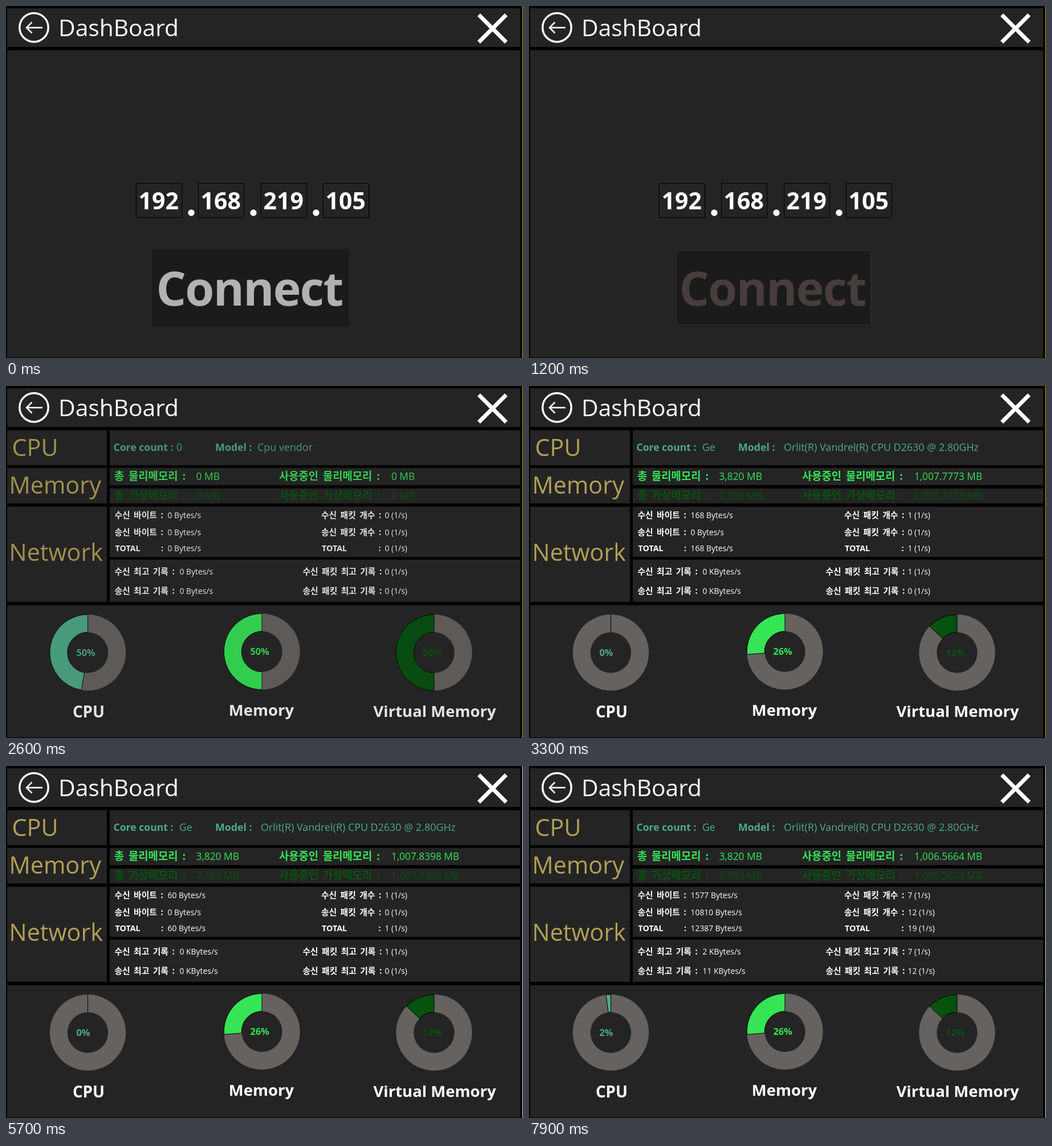
Recreate the animation shown at these times as an HTML page with a canvas. Size 907 by 618 pixels, loop 8000 ms.

```html
<!DOCTYPE html>
<html lang="ko">
<head>
<meta charset="utf-8">
<title>DashBoard</title>
<style>
  html, body { margin: 0; width: 100%; height: 100%; overflow: hidden; background: #000; }
  canvas { display: block; }
</style>
</head>
<body>
<canvas id="stage" width="907" height="618"></canvas>
<script>
const ctx = document.getElementById("stage").getContext("2d");
const LOOP = 8000;
const PANEL = "#242424", WHITE = "#fff", GOLD = "#b3a057";
const TEAL = "#4dab87", LIME = "#35e556", FOREST = "#06520f", RING = "#666260";
const LATIN = '"Open Sans", "Noto Sans", sans-serif';
const HANGUL = '"Noto Sans CJK KR", "Noto Sans CJK", sans-serif';

function text(string, x, y, size, color = WHITE, options = {}) {
  const { weight = 400, family = LATIN, align = "left", letter = 0, word = 0 } = options;
  ctx.font = `${weight} ${size}px ${family}`;
  ctx.textAlign = align;
  ctx.letterSpacing = letter + "px";
  ctx.wordSpacing = word + "px";
  ctx.fillStyle = color;
  ctx.fillText(string, x, y);
}
const bold = (string, x, y, size, color, align) =>
  text(string, x, y, size, color, { weight: 700, align });
const korean = (string, x, y, size, color, word) =>
  text(string, x, y, size, color, { weight: 700, family: HANGUL, word });

function box(x1, y1, x2, y2, color) {
  ctx.fillStyle = color;
  ctx.fillRect(x1, y1, x2 - x1, y2 - y1);
}

function strokePath(points, width) {
  ctx.strokeStyle = WHITE;
  ctx.lineWidth = width;
  ctx.beginPath();
  points.forEach(([x, y], i) => i ? ctx.lineTo(x, y) : ctx.moveTo(x, y));
  ctx.stroke();
}

function drawFrame(t) {
  box(0, 0, 907, 618, "#000");
  box(2, 4, 902, 72, PANEL);
  box(2, 77.5, 902, 617, PANEL);
  box(906, 0, 907, 618, t < 5700 ? "#d9b310" : "#e8e8e8");

  ctx.strokeStyle = WHITE;
  ctx.lineWidth = 3.5;
  ctx.beginPath();
  ctx.arc(49, 37.7, 25.2, 0, 2 * Math.PI);
  ctx.stroke();
  strokePath([[64, 38], [36, 38]], 2.6);
  strokePath([[45.5, 28.5], [36, 38], [45.5, 47.5]], 2.6);
  strokePath([[829.5, 15.5], [877.5, 63.5]], 7);
  strokePath([[877.5, 15.5], [829.5, 63.5]], 7);
  text("DashBoard", 92, 52.5, 40.7);
}

function drawConnect(t) {
  [192, 168, 219, 105].forEach((part, i) => {
    const x = 229 + Math.round(i * 109.4);
    ctx.strokeStyle = "#000";
    ctx.lineWidth = 1;
    ctx.strokeRect(x - 0.5, 311.5, 80, 60);
    bold(part, x + 38.7, 357, 41, WHITE, "center");
    if (i === 3) return;
    ctx.beginPath();
    ctx.arc(x + 96, 363, 5.7, 0, 2 * Math.PI);
    ctx.fill();
  });

  // The button dims in three steps after the press.
  const dim = Math.min(3, Math.floor(t / 400)) / 3;
  const mix = (from, to) => Math.round(from + (to - from) * dim);
  box(255.5, 427.5, 602, 563, "#1b1b1b");
  ctx.strokeStyle = `rgba(44, 38, 38, ${dim})`;
  ctx.lineWidth = 3;
  ctx.strokeRect(257.5, 428.5, 343, 132);
  text("Connect", 263.5, 525.5, 82.5, `rgb(${mix(180, 71)}, ${mix(178, 61)}, ${mix(177, 61)})`,
    { weight: 700, letter: -1.7 });
}

function donut(cx, cy, share, label, labelX, color) {
  const top = -Math.PI / 2, edge = top - share * 2 * Math.PI;
  const sector = (from, to) => {
    ctx.beginPath();
    ctx.arc(cx, cy, 66.7, from, to, true);
    ctx.arc(cx, cy, 35.7, to, from, false);
    ctx.closePath();
  };
  sector(edge, top - 2 * Math.PI);
  ctx.fillStyle = RING;
  ctx.fill();
  sector(top, edge);
  ctx.fillStyle = color;
  ctx.fill();
  ctx.strokeStyle = "#000";
  ctx.lineWidth = 1;
  ctx.stroke();
  bold(label, labelX, cy + 5.5, 16.3, color);
}

const idle = {
  cores: "0", coresX: 299, model: "Cpu vendor", modelX: 441,
  physical: "0 MB", virtual: "0 MB", used: "0",
  bytes: [0, 0], packets: [0, 0], byteRecord: [0, 0], packetRecord: [0, 0], unit: "Bytes/s",
  cpu: 0.473, memory: 0.5, swap: 0.5, labels: ["50%", "50%", "50%"],
};
const live = {
  ...idle, cores: "Ge", coresX: 304, model: "Orlit(R) Vandrel(R) CPU D2630 @ 2.80GHz", modelX: 447,
  physical: "3,820 MB", virtual: "7,783 MB", used: "1,007.7773",
  bytes: [168, 0], packets: [1, 0], packetRecord: [1, 0], unit: "KBytes/s",
  cpu: 0, memory: 0.262, swap: 0.128, labels: ["0%", "26%", "12%"],
};
const updates = [
  [0, idle],
  [3300, live],
  [4200, { ...live, used: "1,007.7930", bytes: [60, 0] }],
  [5100, { ...live, used: "1,007.8398", bytes: [60, 0] }],
  [7000, { ...live, used: "1,007.4219", bytes: [126, 0] }],
  [7900, { ...live, used: "1,006.5664", bytes: [1577, 10810], packets: [7, 12],
    byteRecord: [2, 11], packetRecord: [7, 12], cpu: 0.02, labels: ["2%", "26%", "12%"] }],
];

function drawDashboard(t) {
  const d = updates.findLast(([start]) => t >= start)[1];

  [[139, 144], [206, 212], [379, 385]].forEach(([a, b]) => box(2, a, 902, b, "#000"));
  [[78, 139], [144, 206], [212, 379]].forEach(([a, b]) => box(177, a, 182, b, "#000"));
  [[174, 180], [300, 305]].forEach(([a, b]) => box(182, a, 902, b, "#000"));

  text("CPU", 10.5, 122.5, 41.3, GOLD);
  text("Memory", 5.5, 189, 41.3, GOLD);
  text("Network", 5.5, 306.5, 41.3, GOLD);

  bold("Core count :", 188.5, 114, 17.6, TEAL);
  text(d.cores, d.coresX, 114, 17.5, TEAL);
  bold("Model :", 367, 114, 17.8, TEAL);
  text(d.model, d.modelX, 114, 17.9, TEAL);

  [["물리메모리", d.physical, 164.5, LIME], ["가상메모리", d.virtual, 198.5, FOREST]]
    .forEach(([name, total, y, color]) => {
      korean(`총 ${name} :`, 190, y, 18.8, color, 3.5);
      text(total, 333.5, y, 17.4, color);
      korean(`사용중인 ${name} :`, 479, y, 18.8, color, 3.5);
      text(d.used + " MB", 676, y, 17.3, color);
    });

  const sum = ([received, sent]) => received + sent;
  const value = (string, x, y) => text(string, x, y, 13.9);
  ["수신", "송신"].forEach((way, i) => {
    const y = 232 + i * 29.5, recordY = 330.5 + i * 34.5;
    korean(`${way} 바이트 :`, 190.5, y, 14.8, WHITE, 3);
    value(d.bytes[i] + " Bytes/s", 283.5, y);
    korean(`${way} 패킷 개수 :`, 553, y, 14.8, WHITE, 3);
    value(d.packets[i] + " (1/s)", 664.5, y);
    korean(`${way} 최고 기록 :`, 190.5, recordY, 14.8, WHITE, 3);
    value(`${d.byteRecord[i]} ${d.unit}`, 304.5, recordY);
    korean(`${way} 패킷 최고 기록 :`, 520.5, recordY, 14.8, WHITE, 3);
    value(d.packetRecord[i] + " (1/s)", 664.5, recordY);
  });
  [[191.5, 272, 283.5, sum(d.bytes) + " Bytes/s"], [554, 653.5, 664.5, sum(d.packets) + " (1/s)"]]
    .forEach(([nameX, colonX, valueX, total]) => {
      bold("TOTAL", nameX, 290, 14.3, WHITE);
      bold(":", colonX, 290, 14.3, WHITE);
      value(total, valueX, 290);
    });

  donut(143.5, 468, d.cpu, d.labels[0], 123.5, TEAL);
  donut(449, 466.3, d.memory, d.labels[1], 428.5, LIME);
  donut(751, 468, d.swap, d.labels[2], 731, FOREST);
  bold("CPU", 145, 582, 27.8, WHITE, "center");
  bold("Memory", 448, 579, 27.5, WHITE, "center");
  bold("Virtual Memory", 752, 580.5, 27.5, WHITE, "center");
}

function draw(t) {
  ctx.globalAlpha = 1;
  drawFrame(t);
  const step = Math.floor((t - 2300) / 100);
  if (step <= 0) {
    ctx.globalAlpha = step < 0 ? 1 : 0.35;
    drawConnect(t);
  } else {
    ctx.globalAlpha = [0, 0.14, 0.5, 0.88][step] ?? 1;
    drawDashboard(t);
  }
}

const start = performance.now();
function tick() {
  draw((performance.now() - start) % LOOP);
  requestAnimationFrame(tick);
}
tick();
</script>
</body>
</html>
```
